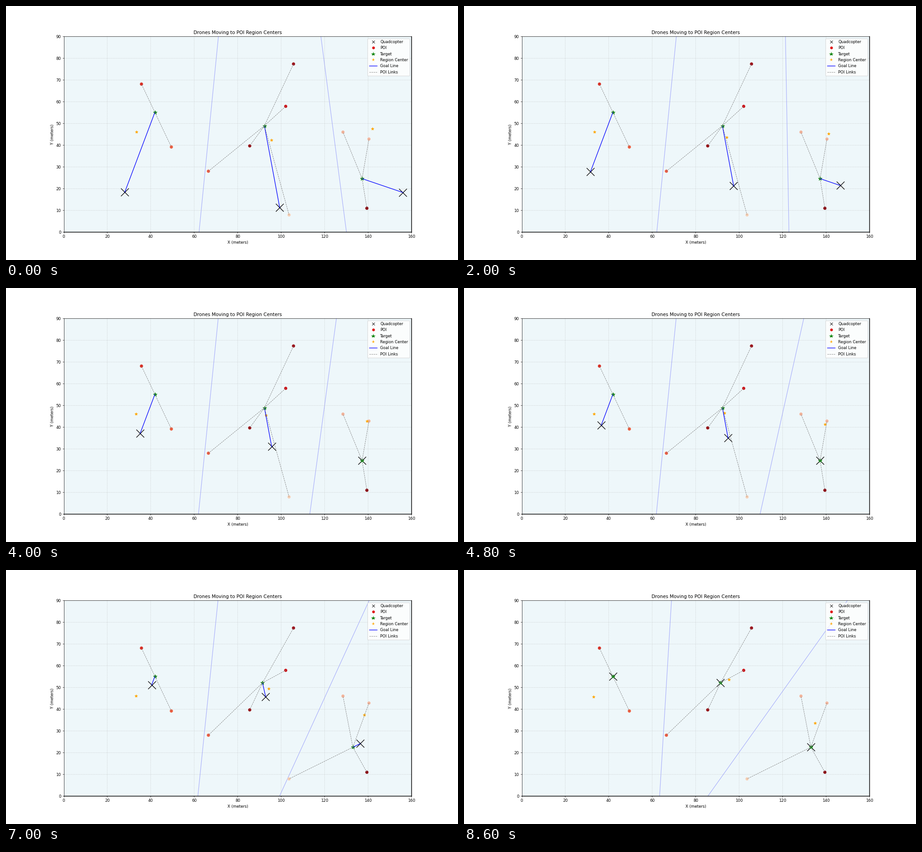
Write a matplotlib script that moves like this. It is 998 by 561 pixels and loops after 10000 ms.

```python
import matplotlib.pyplot as plt
import numpy as np
from matplotlib.animation import FuncAnimation
from matplotlib.lines import Line2D

W, H = 160, 90
DPI = 62.375
FRAMES, INTERVAL = 50, 200
SPEED = 1.0

# x, y, weight, colour
POIS = [
    (35.75, 68.1, 0.736, "#d92f25"),
    (49.5, 39.15, 0.60, "#ee5c3d"),
    (66.55, 28.0, 0.59, "#ea5a40"),
    (85.55, 39.65, 0.95, "#950d13"),
    (102.1, 57.85, 0.75, "#cc181d"),
    (105.7, 77.35, 0.86, "#9b1019"),
    (103.65, 7.9, 0.244, "#f7d0b5"),
    (128.45, 46.0, 0.364, "#f3b59c"),
    (140.4, 42.8, 0.32, "#f4b8a0"),
    (139.45, 10.95, 1.0, "#8b0a12"),
]
POS = np.array([p[:2] for p in POIS])
WEIGHT = np.array([p[2] for p in POIS])
COLOR = [p[3] for p in POIS]
START = np.array([(27.75, 17.5), (99.5, 10.4), (156.9, 17.9)])
YS = np.linspace(0, H, 181)


def bisector(p, q):
    """x along the border between two drones, for each of YS."""
    mid, d = (p + q) / 2, q - p
    return mid[0] - (YS - mid[1]) * d[1] / d[0]


def cell_center(left, right):
    width = right - left
    total = np.trapezoid(width, YS) if hasattr(np, "trapezoid") else np.trapz(width, YS)
    area = np.sum(width[1:-1]) + (width[0] + width[-1]) / 2
    step = YS[1] - YS[0]
    fx, fy = width * (left + right) / 2, width * YS
    cx = (np.sum(fx[1:-1]) + (fx[0] + fx[-1]) / 2) / area
    cy = (np.sum(fy[1:-1]) + (fy[0] + fy[-1]) / 2) * step / total
    return cx, cy


def advance(drones, targets):
    gap = targets - drones
    dist = np.hypot(gap[:, 0], gap[:, 1])[:, None]
    return np.where(dist <= SPEED, targets, drones + SPEED * gap / np.maximum(dist, 1e-9))


def simulate():
    drones, states = START.copy(), []
    for _ in range(FRAMES):
        borders = [bisector(drones[i], drones[i + 1]) for i in range(2)]
        edges = [np.zeros_like(YS), *borders, np.full_like(YS, W)]
        centers = [cell_center(edges[i], edges[i + 1]) for i in range(3)]
        owner = np.argmin(((POS[:, None] - drones[None]) ** 2).sum(axis=2), axis=1)
        targets = np.array([
            np.average(POS[owner == i], axis=0, weights=WEIGHT[owner == i])
            for i in range(3)
        ])
        drones = advance(drones, targets)
        states.append((drones, targets, centers, borders, owner))
    return states


STATES = simulate()

fig, ax = plt.subplots(figsize=(998 / DPI, 561 / DPI), dpi=DPI)
ax.set(xlim=(0, W), ylim=(0, H), aspect="equal", facecolor="#eef7fa",
       xlabel="X (meters)", ylabel="Y (meters)",
       title="Drones Moving to POI Region Centers")
ax.grid(True, linestyle="--", alpha=0.5)
for side in ("right", "bottom"):
    ax.spines[side].set_linewidth(1.7)


def segments(n, **style):
    return [ax.plot([], [], **style)[0] for _ in range(n)]


border_lines = segments(2, color="blue", alpha=0.3, lw=1.3, zorder=1)
ax.scatter(POS[:, 0], POS[:, 1], s=50, c=COLOR, zorder=1.6)
drone_marks = ax.scatter([], [], s=400, c="black", marker="x", lw=1.5, zorder=1.6)
target_marks = ax.scatter([], [], s=100, c="green", marker="*", zorder=1.7)
center_marks = ax.scatter([], [], s=50, c="orange", marker="*", zorder=1.7)
goal_lines = segments(3, color="blue", lw=1.5)
link_lines = segments(len(POIS), color="gray", lw=1, ls="--")


def key(marker, color, size, edge=0):
    return Line2D([], [], ls="none", marker=marker, color=color,
                  markersize=size, markeredgewidth=edge)


ax.legend(
    [key("x", "black", 8, 1), key("o", "#df1010", 7), key("*", "green", 11),
     key("*", "orange", 9), Line2D([], [], color="blue", lw=1.5),
     Line2D([], [], color="gray", lw=1, ls="--")],
    ["Quadcopter", "POI", "Target", "Region Center", "Goal Line", "POI Links"],
    loc="upper right",
)


def join(line, p, q):
    line.set_data([p[0], q[0]], [p[1], q[1]])


def update(i):
    drones, targets, centers, borders, owner = STATES[i]
    drone_marks.set_offsets(drones)
    target_marks.set_offsets(targets)
    center_marks.set_offsets(centers)
    for line, xs in zip(border_lines, borders):
        line.set_data(xs[[0, -1]], YS[[0, -1]])
    for line, p, q in zip(goal_lines, drones, targets):
        join(line, p, q)
    for line, poi, cell in zip(link_lines, POS, owner):
        join(line, targets[cell], poi)
    return [drone_marks, target_marks, center_marks,
            *border_lines, *goal_lines, *link_lines]


anim = FuncAnimation(fig, update, frames=FRAMES, interval=INTERVAL,
                     repeat=True, repeat_delay=0)
plt.show()
```
